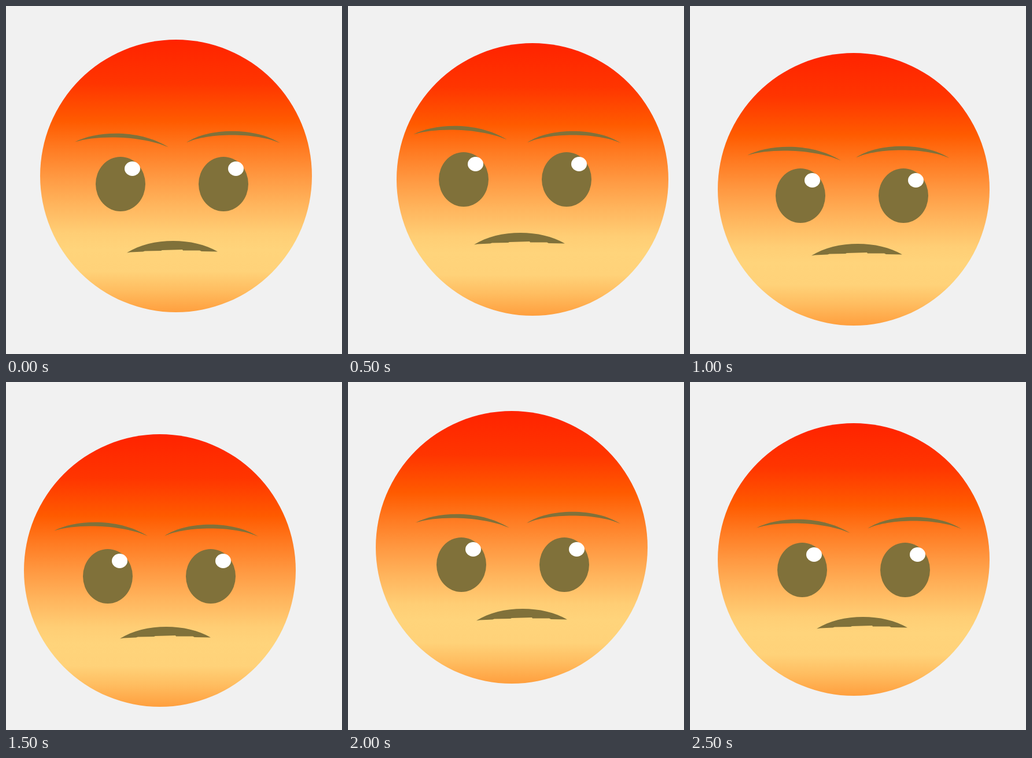
These frames come from a looping animation (581x600 px, 3000 ms). An HTML page with a canvas:

```html
<!DOCTYPE html>
<html lang="en">
<head>
<meta charset="utf-8">
<title>Angry face</title>
<style>
  html, body { margin: 0; width: 100%; height: 100%; overflow: hidden; background: #f1f1f1; }
  canvas { display: block; }
</style>
</head>
<body>
<canvas id="stage" width="581" height="600"></canvas>
<script>
const ctx = document.getElementById('stage').getContext('2d');
const STEP = 500;
const RADIUS = 235;
const OLIVE = '#80713a';

// Each pose: face and left eye centres, then brow and mouth offsets.
const poses = [
  { face: [294, 293], eye: [198, 307], browL: [0, 0],    browR: [0, 0],     mouth: [0, 0] },
  { face: [319, 299], eye: [200, 299], browL: [-6, -13], browR: [-2, 0],    mouth: [9, -14] },
  { face: [283, 316], eye: [191, 327], browL: [-20, 23], browR: [-25, 26],  mouth: [1, 5] },
  { face: [266, 325], eye: [176, 335], browL: [-36, 22], browR: [-38, 30],  mouth: [-12, 17] },
  { face: [283, 285], eye: [196, 315], browL: [-2, 8],   browR: [-3, 8],    mouth: [13, -14] },
  { face: [283, 306], eye: [194, 324], browL: [-4, 17],  browR: [-4.5, 17], mouth: [10, 0] }
];

const browLeft = new Path2D('M119 234.5C155 215 231 211.5 281 243.5C235 223.5 158 222 119 234.5Z');
const browRight = new Path2D('M312 235.5C350 209 433 209 474 236.5C434 218 350 218 312 235.5Z');
const mouth = new Path2D('M209 425.5C251 398.5 324 398.5 366 423.5L338 423L335 421.5L306 421.5' +
  'L305 420L270 421L268 422L240 422.5L237 423.5L215 424.5Z');

const skin = ctx.createLinearGradient(0, -RADIUS, 0, RADIUS);
[
  [0, '#ff2300'], [0.16, '#ff3500'], [0.3, '#ff5b00'], [0.4, '#ff7b22'],
  [0.5, '#ff9841'], [0.6, '#ffb35b'], [0.71, '#ffce75'], [0.77, '#ffd47b'],
  [0.85, '#ffd279'], [0.92, '#ffbd60'], [1, '#ff9f3e']
].forEach(([at, color]) => skin.addColorStop(at, color));

function place([x, y], draw) {
  ctx.save();
  ctx.translate(x, y);
  draw();
  ctx.restore();
}

function oval(x, y, rx, ry, color) {
  ctx.fillStyle = color;
  ctx.beginPath();
  ctx.ellipse(x, y, rx, ry, 0, 0, Math.PI * 2);
  ctx.fill();
}

function shape(offset, path) {
  place(offset, () => {
    ctx.fillStyle = OLIVE;
    ctx.fill(path);
  });
}

function drawEyes() {
  oval(0, 0, 43, 47, OLIVE);
  oval(178, 0, 43, 47, OLIVE);
  oval(20.5, -26.5, 13.5, 12.5, '#fff');
  oval(199.5, -26.5, 13.5, 12.5, '#fff');
}

function render(time) {
  const pose = poses[Math.floor(time / STEP) % poses.length];
  ctx.fillStyle = '#f1f1f1';
  ctx.fillRect(0, 0, 581, 600);
  place(pose.face, () => oval(0, 0, RADIUS, RADIUS, skin));
  place(pose.eye, drawEyes);
  shape(pose.browL, browLeft);
  shape(pose.browR, browRight);
  shape(pose.mouth, mouth);
}

const start = performance.now();
function tick() {
  render(performance.now() - start);
  requestAnimationFrame(tick);
}
tick();
</script>
</body>
</html>
```
